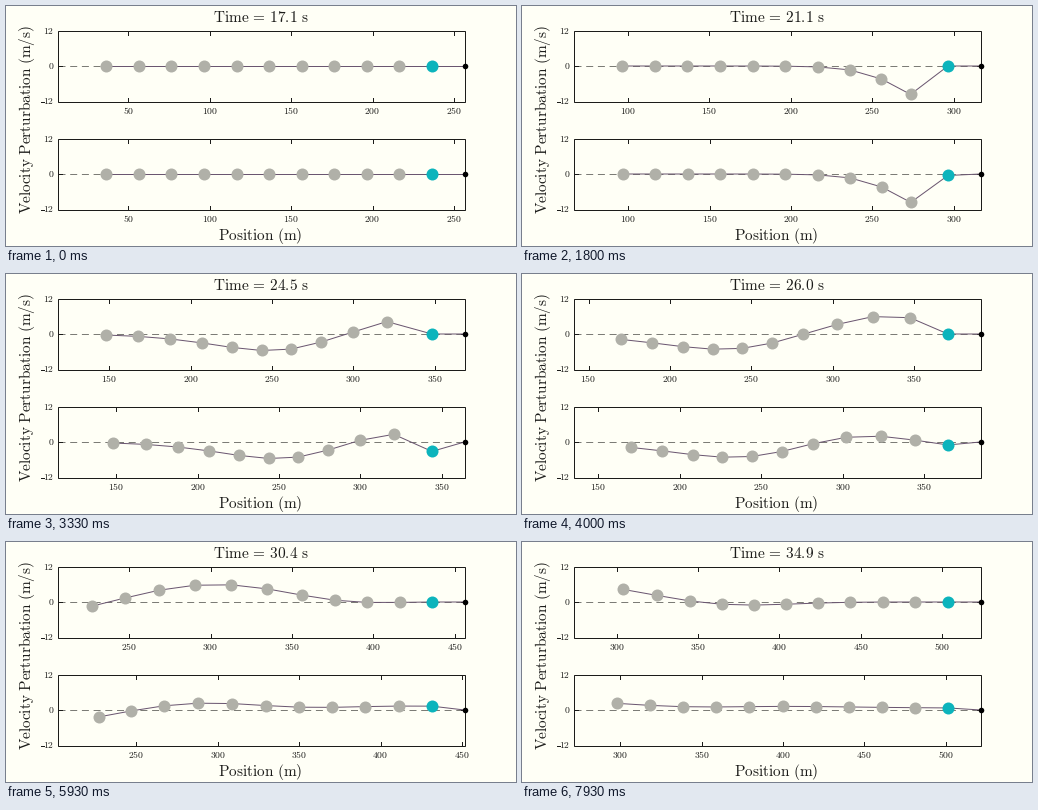
These frames come from a looping animation (510 by 240 pixels, 7.99 s). A matplotlib script:

```python
import numpy as np
import matplotlib.pyplot as plt
from matplotlib.animation import FuncAnimation
from matplotlib.patches import Rectangle

W, H, DPI = 510, 240, 80
FRAMES, LOOP_MS = 120, 7990
PT = 72 / DPI                      # points per pixel
LEFT, RIGHT, SPAN = 51.5, 458.5, 250
X_SCALE = (RIGHT - LEFT) / SPAN
HALF = 35.5                        # half height of a panel
V_SCALE = HALF / 6                 # pixels per m/s

INK, GREY, CYAN, TRACE = "#1c1c1a", "#b0b0a8", "#0cb4bc", "#6a5670"
plt.rcParams["mathtext.fontset"] = "cm"

# Car following: optimal velocity model with bounded acceleration
CARS, V0, GAP = 11, 15, 20
T0, T1, DT = 17.0, 35.0, 0.01
TIMES = np.arange(T0, T1, DT)

# Speed of the responsive lead car, relative to V0
LEAD_T = [20, 21.1, 22.1, 23.05, 24.2, 25.2, 26.05, 26.9, 27.85, 29.1, 30.4, 32.5, 34.9]
LEAD_V = [0, -0.25, -0.95, -1.5, -1.75, -1.3, -0.5, 0.1, 0.45, 0.65, 0.65, 0.5, 0.35]


def simulate(lead):
    x = V0 * T0 - GAP * np.arange(1.0, CARS + 1)
    v = np.zeros(CARS)
    history = []
    for t, lead_v in zip(TIMES, lead):
        v[0] = lead_v
        history.append((x.copy(), v.copy()))
        gap = np.clip(x[:-1] - x[1:], 5, 35)
        wish = -V0 * np.cos(np.pi * (gap - 5) / 30)
        acc = np.clip(0.6 * (wish - v[1:]) + 0.9 * (v[:-1] - v[1:]), -5, 2)
        if 20 <= t < 21:
            acc[0] = -5            # the first follower brakes hard
        x += (V0 + v) * DT
        v[1:] += acc * DT
    return history


fig = plt.figure(figsize=(W / DPI, H / DPI), dpi=DPI, facecolor="#fffff6")
ax = fig.add_axes([0, 0, 1, 1])
ax.set(xlim=(0, W), ylim=(H, 0))
ax.axis("off")


def label(x, y, s, px=9.7, **kw):
    kw = {"ha": "center", "va": "baseline", **kw}
    return ax.text(x, y, s, fontsize=px * PT, color=INK, **kw)


def line(x, y, color=INK, **kw):
    return ax.plot(x, y, color=color, lw=PT, **kw)[0]


def dots(color, px, z):
    return ax.plot([], [], "o", ms=px * PT, mfc=color, mec="none", zorder=z)[0]


class Panel:
    def __init__(self, mid, lead):
        self.mid, self.history = mid, simulate(lead)
        top, bottom = mid - HALF, mid + HALF
        self.tick_y = [top, top + 4, np.nan, bottom, bottom - 4, np.nan]
        ax.add_patch(Rectangle((LEFT, top), RIGHT - LEFT, 2 * HALF,
                               fill=False, ec=INK, lw=PT, zorder=1))
        for y, s in ((top, "12"), (mid, "0"), (bottom, "12")):
            label(48, y + 3, f"${s}$", ha="right")
        line([35, 38], [bottom + 0.8] * 2)
        for x, d in ((LEFT, 4), (RIGHT, -4)):
            line([x, x + d], [mid, mid])
        line([LEFT, RIGHT], [mid, mid], "#7c7c76", ls=(0, (7, 4.7)), zorder=1)
        self.ticks = line([], [], snap=True, zorder=1)
        self.names = [label(0, bottom + 12, "") for _ in range(6)]
        self.trace = line([], [], TRACE, zorder=2)
        self.cars = dots(GREY, 12, 3)
        self.lead = dots(CYAN, 12, 4)
        self.head = dots("black", 5.6, 4)
        self.head.set_data([RIGHT], [mid])

    def show(self, t):
        x, v = self.history[round((t - T0) / DT)]
        edge = x[0] + GAP
        px = RIGHT + (x - edge) * X_SCALE
        py = self.mid - v * V_SCALE
        self.trace.set_data(np.r_[RIGHT, px], np.r_[self.mid, py])
        self.cars.set_data(px[1:], py[1:])
        self.lead.set_data(px[:1], py[:1])

        marks = np.arange(np.ceil((edge - SPAN) / 50), edge / 50) * 50
        mx = RIGHT + (marks - edge) * X_SCALE
        self.ticks.set_data(np.repeat(mx, 6), np.tile(self.tick_y, len(mx)))
        for i, name in enumerate(self.names):
            name.set_visible(i < len(mx))
            if i < len(mx):
                name.set_x(mx[i])
                name.set_text(f"${marks[i]:.0f}$")


panels = [Panel(60, np.zeros(len(TIMES))),
          Panel(168, np.interp(TIMES, LEAD_T, LEAD_V))]
title = label(255, 15.5, "", 15.3)
label(254.5, 234, r"$\mathrm{Position\ (m)}$", 15.3)
label(25.5, 113.5, r"$\mathrm{Velocity\ Perturbation\ (m/s)}$", 15.3,
      rotation=90, rotation_mode="anchor")


def update(i):
    t = max(17.1, 17.05 + 0.15 * i)
    title.set_text(rf"$\mathrm{{Time\,=\,{t - 1e-6:.1f}\ s}}$")
    for panel in panels:
        panel.show(t)


anim = FuncAnimation(fig, update, frames=FRAMES, interval=LOOP_MS / FRAMES,
                     repeat=True, repeat_delay=0, blit=False)
plt.show()
```
